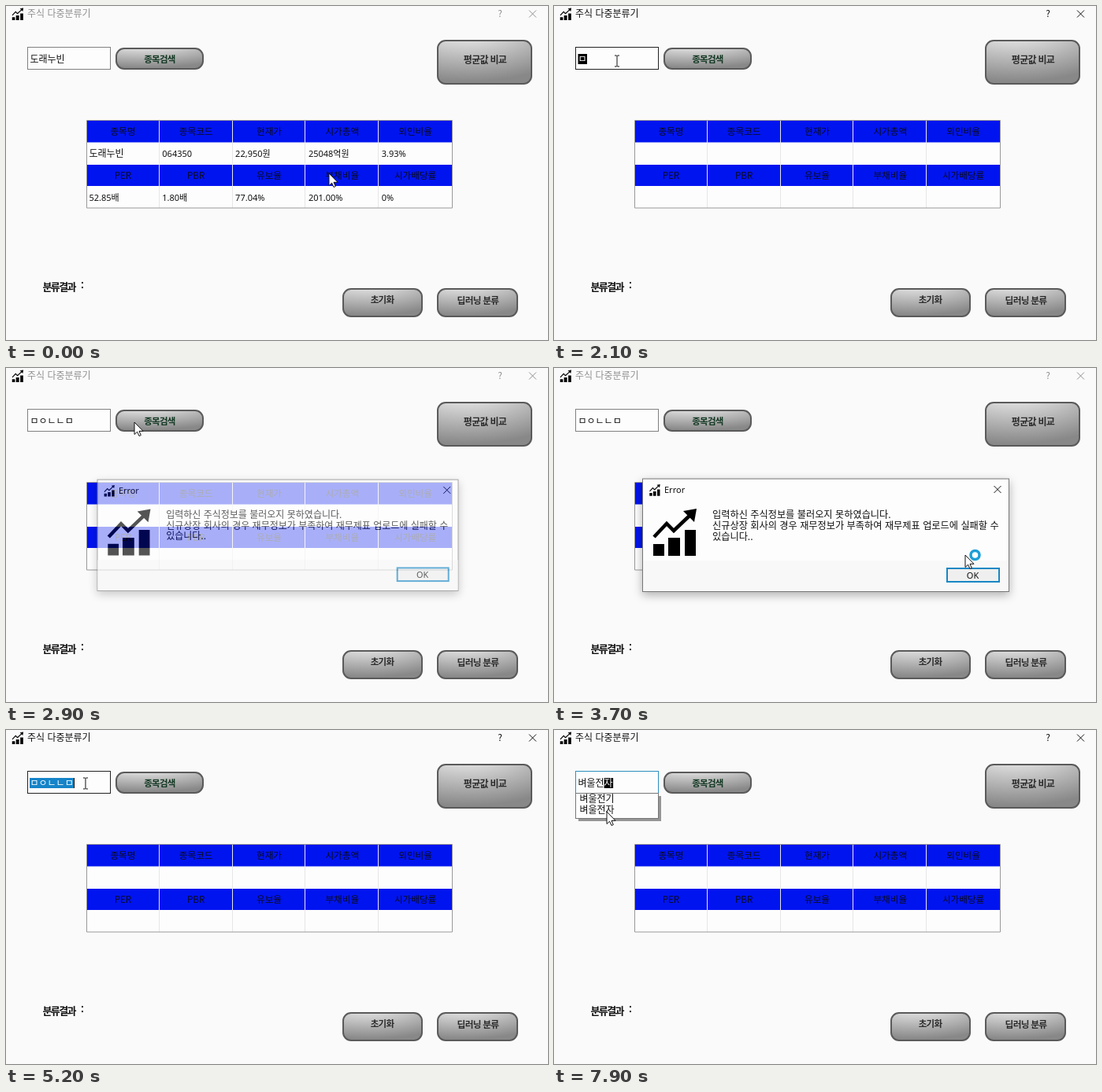
These frames come from a looping animation (688x425 px, 8000 ms). An HTML page:

```html
<!DOCTYPE html>
<html lang="ko">
<head>
<meta charset="utf-8">
<style>
html, body { margin: 0; width: 100%; height: 100%; overflow: hidden; background: #fafafa; }
svg { display: block; }
text { font: 12px 'Noto Sans CJK KR', 'Noto Sans CJK', sans-serif; fill: #111; white-space: pre; }
.mid { text-anchor: middle; }
.num { font: 11px 'Noto Sans', 'Noto Sans CJK KR', sans-serif; }
.head { font-size: 11.6px; font-weight: 500; fill: #0c0c1c; }
.btn text { font-weight: 700; letter-spacing: -.7px; fill: #2c2c2c; }
.btn rect { stroke: #5a5a5a; stroke-width: 2; }
.line { fill: none; stroke: #111; }
</style>
</head>
<body>
<svg width="688" height="425" viewBox="0 0 688 425">
  <defs>
    <radialGradient id="gray" cx=".3" cy="-.4" r="1.35"><stop stop-color="#fff"/><stop offset="1" stop-color="#888"/></radialGradient>
    <radialGradient id="light" cx=".3" cy="-.4" r="1.35"><stop stop-color="#fff"/><stop offset="1" stop-color="#bbb"/></radialGradient>
    <filter id="shadow" x="-10%" y="-20%" width="120%" height="150%"><feDropShadow dx="0" dy="4" stdDeviation="6" flood-opacity=".3"/></filter>
    <g id="chart">
      <path d="M1 45h14v15H1zM20 37h15v23H20zM41 27h14v33H41z"/>
      <path d="M2 36 18 19 27 28 48 8" fill="none" stroke="#000" stroke-width="4.5"/>
      <path d="M56 0 39 3 53 17z"/>
    </g>
  </defs>

  <use href="#chart" transform="translate(7.5 2.5) scale(.26)"/>
  <g id="bar">
    <text x="27" y="14.3">주식 다중분류기</text>
    <text class="mid" x="627" y="14.3">?</text>
    <path class="line" d="m664 5.5 9 9m0-9-9 9"/>
  </g>

  <rect id="field" x="27.5" y="52.5" width="105" height="28" fill="#fdfdfd"/>
  <rect id="mark" y="61" height="13"/>
  <text id="typed" x="30.5" y="71.5"></text>
  <text id="comp" y="71.5" style="fill:#fff"></text>
  <path id="caret" class="line" d="M0 61v13"/>

  <g id="buttons"></g>
  <text x="46.5" y="362" style="font-size:13px;font-weight:700;letter-spacing:-1.6px">분류결과</text>
  <text x="95" y="360" style="font-weight:700">:</text>
  <g id="table"></g>

  <g id="list">
    <rect id="drop" x="31" y="84" width="105" fill="#000" opacity=".4"/>
    <rect id="panel" x="27.5" y="80.5" width="105" fill="#fdfdfd" stroke="#777"/>
    <g id="items"></g>
    <g id="scroll">
      <path d="M115 81h17v101h-17z" fill="#f0f0f0"/>
      <path d="M116 97h14v28h-14z" fill="#cdcdcd"/>
      <path class="line" stroke-width="1.6" d="m119.500 91 3.500-3.500 3.500 3.500m-7 80 3.500 3.500 3.500-3.500"/>
    </g>
  </g>

  <g id="dialog">
    <rect x="112.500" y="141" width="465" height="143.500" fill="#fdfdfd" stroke="#777" filter="url(#shadow)"/>
    <path d="M113 245h464v39H113z" fill="#f8f8f8"/>
    <use href="#chart" transform="translate(121 148) scale(.245)"/>
    <text x="140" y="159" class="num">Error</text>
    <path class="line" d="m558.500 150 9 9m0-9-9 9"/>
    <use href="#chart" transform="translate(125 179)"/>
    <g style="font-size:12.2px">
      <text style="font-size:inherit" x="201" y="190.500">입력하신 주식정보를 불러오지 못하였습니다.</text>
      <text style="font-size:inherit" x="201" y="204.500">신규상장 회사의 경우 재무정보가 부족하여 재무제표 업로드에 실패할 수</text>
      <text style="font-size:inherit" x="201" y="218.500">있습니다..</text>
    </g>
    <rect id="ok" x="499" y="255" width="66" height="17" stroke="#1787c4" stroke-width="2"/>
    <text class="mid num" x="531.500" y="267.500">OK</text>
  </g>

  <path id="arrow" d="M0 0V15.500L3.600 12.200 6 17.500 8.300 16.500 6 11.300H11Z" fill="#fff" stroke="#111"/>
  <path id="beam" class="line" d="M-3-7h2.500l.5.500.5-.500H3M0-6.500v13M-3 7h2.500L0 6.500l.5.500H3"/>
  <circle id="busy" r="5.500" fill="#fff" stroke="#1e9fd6" stroke-width="3.500"/>
</svg>
<script>
const $ = id => document.getElementById(id);
const set = (id, attrs) => { for (const k in attrs) $(id).setAttribute(k, attrs[k]); };
const show = (id, on) => { $(id).style.display = on ? '' : 'none'; };
const label = (cls, x, y, s) => `<text class="${cls}" x="${x}" y="${y}">${s}</text>`;
const CHAR = 11.04, LEFT = 30.5;

// x, y, width, height, text, text x, baseline, font size
const buttons = [
  [140, 54, 110, 26, '종목검색', 195, 71.5, 11.5],
  [548, 44, 119, 55, '평균값 비교', 608, 73, 12],
  [428, 360, 100, 35, '초기화', 477.5, 378, 11.5],
  [548, 360, 101, 35, '딥러닝 분류', 599, 378.5, 11.7]
];
$('buttons').innerHTML = buttons.map(([x, y, w, h, s, tx, ty, size], i) =>
  `<g class="btn"><rect x="${x}" y="${y}" width="${w}" height="${h}" rx="10"/>
  <text class="mid" x="${tx}" y="${ty}" style="font-size:${size}px${i ? '' : ';fill:#123822'}">${s}</text></g>`).join('');
const faces = document.querySelectorAll('.btn rect');

const heads = [['종목명', '종목코드', '현재가', '시가총액', '외인비율'],
  ['PER', 'PBR', '유보율', '부채비율', '시가배당률']];
const values = [['도래누빈', '064350', '22,950원', '25048억원', '3.93%'],
  ['52.85배', '1.80배', '77.04%', '201.00%', '0%']];
const col = i => 102 + i * 92.8;
const cells = (rows, fn) => rows.map((row, r) => row.map((s, c) => fn(s, c, r * 56)).join('')).join('');
let grid = '<path d="M102 146h464v111H102z" fill="#fdfdfd"/><path d="M102 146h464v27.500H102zM102 202h464v27H102z" fill="#0014f0"/>';
for (let i = 1; i < 5; i++) {
  const x = Math.round(col(i)) - .5;
  grid += `<path d="M${x} 146v111" stroke="#e6e6e6"/>`;
}
grid += '<path d="M102.500 145.500h464v111.500h-464z" fill="none" stroke="#999"/>';
$('table').innerHTML = grid
  + cells(heads, (s, c, y) => label('head mid', col(c) + 46.4, 163.5 + y, s))
  + '<g id="values">' + cells(values, (s, c, y) => label(c + y ? 'num' : '', col(c) + 3.5, 191.5 + y, s)) + '</g>';

const PRE = '벼울';
const names = ['바이오로...', '물산', '아이디엔티', '생명', '카드', '출판사', '엔지니어링'];
const filtered = ['전기', '전자'];

// [time, committed text, syllable being composed]
const typing = [
  [0, '도래누빈', ''], [600, '', ''],
  [2100, '', 'ㅁ'], [2200, 'ㅁ', 'ㅇ'], [2300, 'ㅁㅇ', 'ㄴ'], [2400, 'ㅁㅇㄴ', 'ㄴ'],
  [2500, 'ㅁㅇㄴㄴ', 'ㅁ'], [2700, 'ㅁㅇㄴㄴㅁ', ''],
  [5800, '', 'ㅂ'], [5900, '', '벼'], [6000, '', '병'], [6100, '벼', '우'], [6200, '벼', '울'],
  [6300, '벼울', 'ㅈ'], [6400, '벼울', '저'], [6500, '벼울', '전'], [6900, '벼울전', '자']
];
const path = [
  [0, 410, 213], [500, 474, 374], [600, 474, 374], [900, 282, 254], [1700, 80, 70],
  [2400, 80, 70], [2700, 163, 69], [2900, 163, 69], [3700, 522, 238], [3800, 528, 256],
  [4100, 530, 260], [4300, 530, 260], [4900, 101, 68], [7500, 100, 67], [7900, 67, 104]
];
const last = (keys, t) => keys.reduce((i, k, n) => k[0] <= t ? n : i, 0);

function cursorAt(t) {
  const i = last(path, t), a = path[i], b = path[i + 1] || a;
  let p = a === b ? 0 : (t - a[0]) / (b[0] - a[0]);
  p = p * p * (3 - 2 * p);
  return [a[1] + (b[1] - a[1]) * p, a[2] + (b[2] - a[2]) * p];
}

function draw(t) {
  const [x, y] = cursorAt(t);
  const inside = (l, top, w, h) => x >= l && x < l + w && y >= top && y < top + h;
  const modal = t >= 2800 && t < 4300, listed = t >= 6100;
  const inField = inside(27, 52, 106, 29);
  const dim = t < 600 || modal;

  $('bar').style.opacity = dim ? .45 : 1;
  show('values', t < 600);
  faces.forEach((f, i) => f.setAttribute('fill', inside(...buttons[i].slice(0, 4)) && !modal ? 'url(#light)' : 'url(#gray)'));

  // search field
  const [, text, comp] = typing[last(typing, t)];
  const selected = t >= 5000 && t < 5800;
  const end = LEFT + text.length * CHAR;
  $('typed').textContent = text;
  $('typed').style.fill = selected ? '#fff' : '#111';
  $('comp').textContent = comp;
  set('comp', { x: end });
  set('mark', selected ? { x: 30, width: 56, fill: '#1584c8' } : { x: end, width: comp ? 11.5 : 0, fill: '#000' });
  set('caret', { transform: `translate(${Math.round(end) + .5} 0)` });
  show('caret', t >= 1700 && t < 2100 || selected && t < 5600);
  set('field', { stroke: t >= 5800 ? '#2a8fbd' : inField ? '#222' : '#808080' });

  // suggestions
  const items = t >= 6900 ? filtered : names;
  const height = items === names ? 102 : 32;
  show('list', listed);
  show('scroll', items === names);
  set('panel', { height });
  set('drop', { height });
  $('items').innerHTML = items.map((s, i) => label('', 32.5, 92.3 + i * 13.9, PRE + s)).join('');

  // message box
  const p = Math.max(0, Math.min(1, (t - 2800) / 150, 1 - (t - 4200) / 150));
  const k = .955 + .045 * p;
  show('dialog', p > 0);
  set('dialog', { opacity: p, transform: `translate(345 213) scale(${k}) translate(-345 -213)` });
  set('ok', { fill: t >= 4100 ? '#cce4f7' : t >= 3900 ? '#e5f1fb' : '#efefef' });

  // pointer
  const beam = inField && !listed && !modal;
  show('arrow', !beam);
  show('beam', beam);
  show('busy', t >= 3100 && t < 3800);
  for (const id of ['arrow', 'beam']) set(id, { transform: `translate(${x} ${y})` });
  set('busy', { cx: x + 12.5, cy: y });
}

const start = performance.now();
function tick() {
  const t = (performance.now() - start) % 8000;
  draw(Math.floor(t / 100) * 100); // the screen refreshes ten times a second
  requestAnimationFrame(tick);
}
tick();
</script>
</body>
</html>
```
